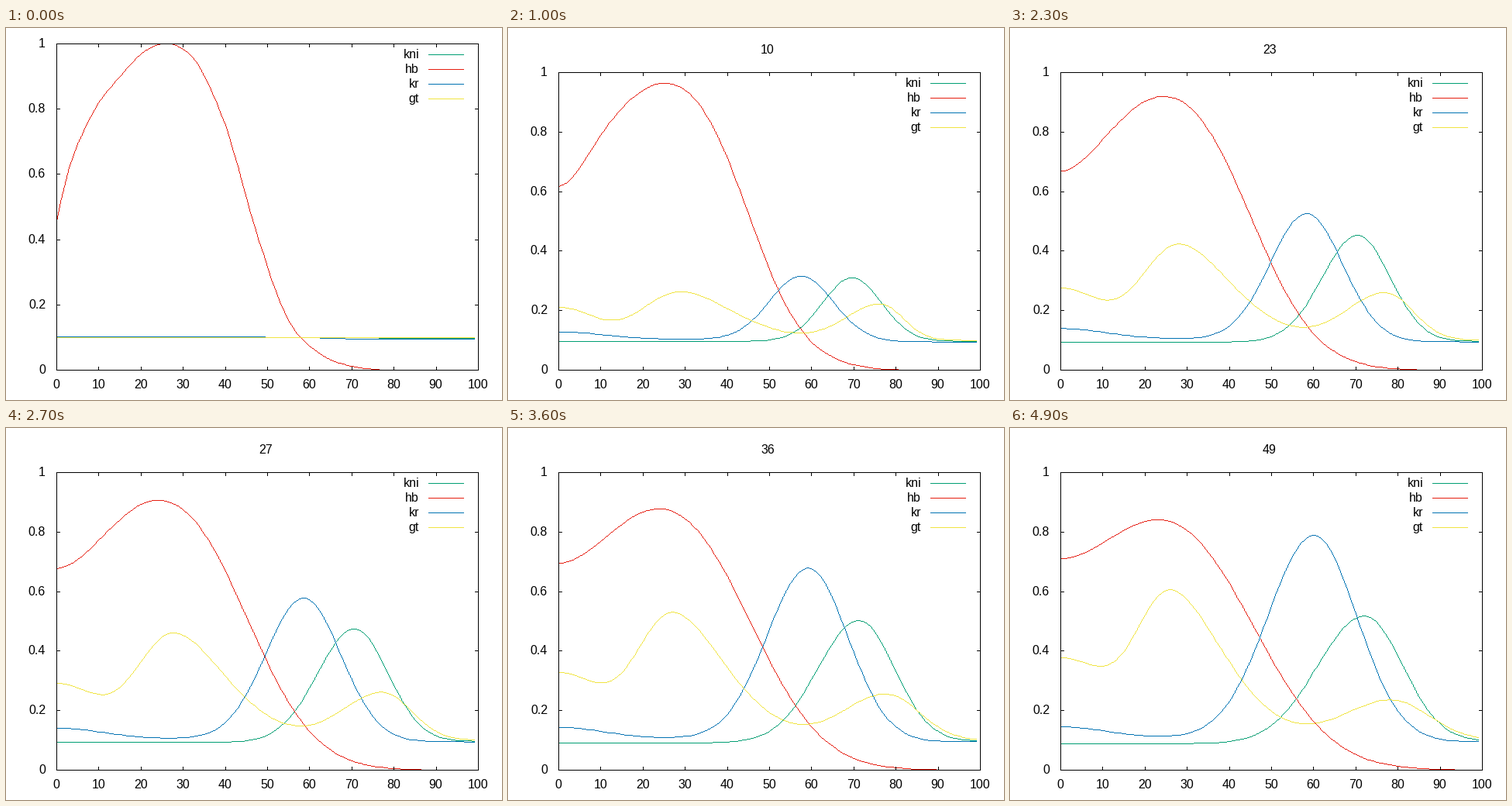
Animation, 640 px wide and 480 px high, one loop 5000 ms. Source, as a matplotlib script:

```python
import numpy as np
import matplotlib.pyplot as plt
from matplotlib.animation import FuncAnimation
from matplotlib.colors import to_rgb

WIDTH, HEIGHT, DPI = 640, 480, 100
FRAMES, INTERVAL = 50, 100
LEFT, RIGHT, BOTTOM = 65, 609, 441

plt.rcParams["font.family"] = "Liberation Sans"
plt.rcParams["font.size"] = 16 * 72 / DPI

GENES = {"kni": "#009e73", "hb": "#e51e10", "kr": "#0072b2", "gt": "#f0e442"}
CELLS = np.arange(100)

# A few points of the starting hb profile.
HB_X = np.array([0, 3, 7, 15, 22, 27, 33, 40, 48, 55, 62, 70, 78, 99])
HB_Y = np.array([.455, .62, .75, .9, .986, 1, .945, .75, .395, .152, .054,
                 .012, 0, 0])


def smooth(at, knots, values):
    """Cubic Hermite interpolation."""
    slopes = np.gradient(values, knots, edge_order=2)
    i = np.clip(np.searchsorted(knots, at, "right") - 1, 0, len(knots) - 2)
    h = knots[i + 1] - knots[i]
    u = (at - knots[i]) / h
    return (values[i] * (1 + 2 * u) * (1 - u) ** 2
            + values[i + 1] * u ** 2 * (3 - 2 * u)
            + h * u * (1 - u) * (slopes[i] * (1 - u) - slopes[i + 1] * u))


def grow(t, gain, tau, power=1):
    return gain * (1 - np.exp(-(t / tau) ** power))


def bell(centre, widths, powers=(2, 2)):
    """Bump of height 1 with its own width and falloff on each side."""
    side = (CELLS >= centre).astype(int)
    distance = np.abs(CELLS - centre) / np.take(widths, side)
    return np.exp(-distance ** np.take(powers, side))


def over_base(peak, centre, widths, bases):
    base = np.where(CELLS < centre, *bases)
    return base + (peak - base) * bell(centre, widths)


def edge(reach):
    return np.exp(-(CELLS / reach) ** 2)


def kni(t):
    return over_base(.1 + grow(t, .424, 13.9, 1.15), 69 + .0625 * t,
                     (8.4 + .152 * t, 9.1 + .075 * t),
                     (.099 - .0002 * t, .097))


def hb(t):
    # Diffusion with a wall at the left end, and slow decay.
    x, y = CELLS[:, None], CELLS
    variance = .05 + 2.7 * t
    kernel = (np.exp(-(x - y) ** 2 / (2 * variance))
              + np.exp(-(x + y + 1) ** 2 / (2 * variance)))
    kernel /= kernel.sum(axis=1, keepdims=True)
    start = np.clip(smooth(CELLS, HB_X, HB_Y), 0, 1)
    return kernel @ start * np.exp(-.00094 * t)


def kr(t):
    return (over_base(.1 + grow(t, .975, 40), 56.8 + .066 * t,
                      (9.4 + .121 * t, 10 + .091 * t),
                      (.102 + .00012 * t, .095))
            + grow(t, .038, 9) * edge(15))


def gt(t):
    front = bell(30 - .06 * t, (13.2 - .03 * t, 17.3), (2.2, 1.75))
    back = bell(75.7 + .055 * t, (10.4 + .11 * t, 6.4 + .13 * t))
    return (.1 + grow(t, .56, 26.8, 1.08) * front
            + grow(t, .184 - 2e-5 * t ** 2, 9) * back
            + (grow(t, .09, 6) + .0038 * t) * edge(11.3 + .13 * t))


fig = plt.figure(figsize=(WIDTH / DPI, HEIGHT / DPI), dpi=DPI, facecolor="white")
ax = fig.add_axes([0, 0, 1, 1])


def line(canvas, xs, ys, color="black"):
    """Polyline one pixel wide, without antialiasing."""
    points = np.rint(np.column_stack([xs, ys])).astype(int)
    for start, end in zip(points, points[1:]):
        count = np.abs(end - start).max() + 1
        px, py = np.rint(np.linspace(start, end, count)).astype(int).T
        canvas[py, px] = to_rgb(color)


def label(x, y, text, align="center"):
    ax.text(x, y, text, ha=align, va="baseline", color="black")


def draw_frame(canvas, top):
    line(canvas, [LEFT, RIGHT, RIGHT, LEFT, LEFT],
         [top, top, BOTTOM, BOTTOM, top])
    for k in range(11):
        x = LEFT + (RIGHT - LEFT) * k / 10
        line(canvas, [x, x], [BOTTOM, BOTTOM - 4])
        line(canvas, [x, x], [top, top + 4])
        label(x, 465, str(10 * k))
    for k in range(6):
        y = BOTTOM - (BOTTOM - top) * k / 5
        line(canvas, [LEFT, LEFT + 4], [y, y])
        line(canvas, [RIGHT, RIGHT - 4], [y, y])
        label(51, round(y) + 5, f"{k / 5:g}", "right")


def update(step):
    ax.clear()
    ax.axis("off")
    canvas = np.ones((HEIGHT, WIDTH, 3))
    top = 57 if step else 20
    xs = LEFT + (RIGHT - LEFT) * CELLS / 100
    for k, (gene, (name, color)) in enumerate(zip((kni, hb, kr, gt), GENES.items())):
        line(canvas, xs, BOTTOM - (BOTTOM - top) * gene(step), color)
        y = top + 14 + 19 * k
        line(canvas, [545, 590], [y, y], color)
        label(533, y + 5, name, "right")
    draw_frame(canvas, top)
    if step:
        label(335, 33, str(step))
    ax.imshow(canvas, extent=(0, WIDTH, HEIGHT, 0), interpolation="nearest",
              aspect="auto")
    return []


anim = FuncAnimation(fig, update, frames=FRAMES, interval=INTERVAL,
                     init_func=lambda: [], repeat=True, repeat_delay=0)
plt.show()
```
